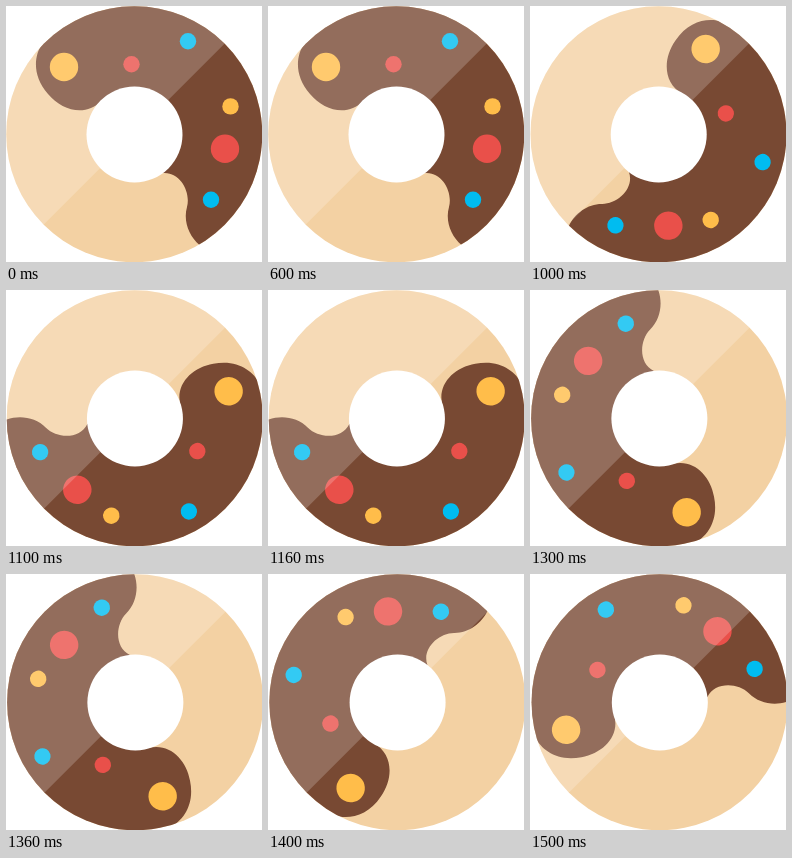
Write an HTML page that moves like this. It is 256 px wide and 256 px high and loops after 1600 ms.

```html
<!DOCTYPE html>
<html lang="en">
<head>
<meta charset="utf-8">
<title>Turning donut</title>
<style>
  html, body { margin: 0; width: 100%; height: 100%; overflow: hidden; background: #fff; }
  svg { display: block; width: 100%; height: 100%; }
</style>
</head>
<body>
<svg viewBox="0 0 256 256">
  <clipPath id="round"><circle cx="128.25" cy="128.25" r="128"/></clipPath>
  <g id="donut">
    <g clip-path="url(#round)">
      <rect width="257" height="257" fill="#f3d1a3"/>
      <g id="topping">
        <path fill="#784933" d="M36 38 V-10 H270 V260 H207 L193.5 239
          C183 230 177 215 181 201 C185 186 174 165.5 157 167
          L128.5 128.5 L95 95 C80 111 56 105 42 88 C26 70 28 50 36 38Z"/>
        <g id="sprinkles"></g>
      </g>
      <!-- Fixed light on the upper left half -->
      <path fill="#fff" fill-opacity=".2" d="M-4 -4 H260.25 L-4 260.25Z"/>
    </g>
    <circle cx="128.5" cy="128.5" r="48" fill="#fff"/>
  </g>
</svg>
<script>
const LOOP = 1600, REST = 1000, STEP = 100;
const donut = document.getElementById('donut');
const topping = document.getElementById('topping');
const sprinkles = document.getElementById('sprinkles');
const yellow = '#ffbd4a', red = '#e9504a', blue = '#00bcf0';

function addSprinkle(x, y, r, fill) {
  const dot = document.createElementNS('http://www.w3.org/2000/svg', 'circle');
  Object.entries({ cx: x, cy: y, r, fill }).forEach(([k, v]) => dot.setAttribute(k, v));
  sprinkles.append(dot);
}

addSprinkle(58, 61, 14.2, yellow);
addSprinkle(125.5, 58.2, 8.2, red);
addSprinkle(182, 35.3, 8.2, blue);
addSprinkle(224.5, 100.4, 8.2, yellow);
addSprinkle(219, 142.8, 14.2, red);
addSprinkle(205, 193.8, 8.2, blue);

// Rests, then makes one turn in hard 45 degree jumps with a slight drift.
function draw(time) {
  const t = time % LOOP;
  const step = t < REST ? 0 : 1 + Math.floor((t - REST) / STEP);
  const angle = step ? 30 + step * 45 : 0;
  topping.setAttribute('transform', `rotate(${angle} 128.5 128.5)`);
  donut.setAttribute('transform', `translate(${step * 0.22} 0)`);
}

const start = performance.now();
function tick() {
  draw(performance.now() - start);
  requestAnimationFrame(tick);
}
tick();
</script>
</body>
</html>
```
